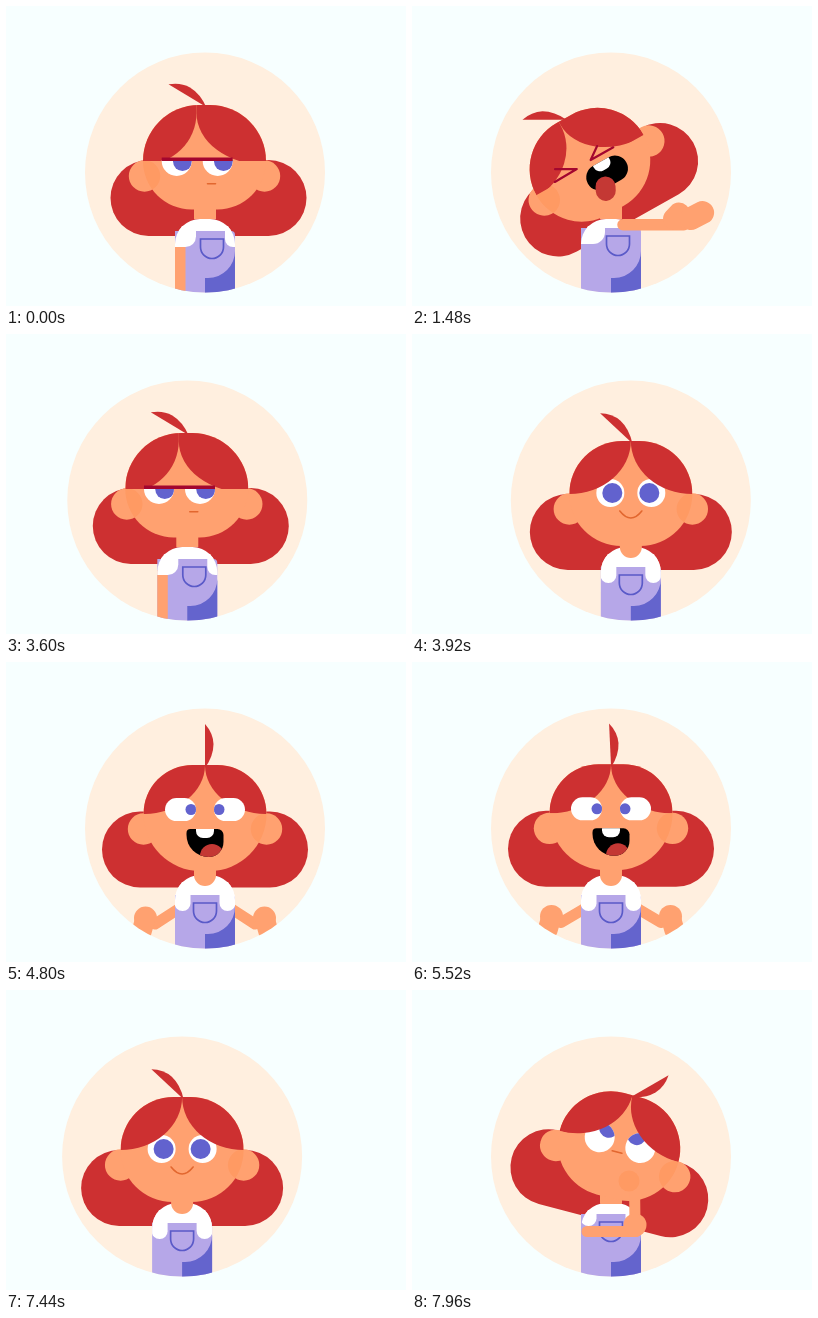
Write an HTML page with a canvas that moves like this. It is 400x300 px and loops after 8 s.

```html
<!DOCTYPE html>
<html lang="en">
<head>
<meta charset="utf-8">
<title>Moods</title>
<style>
html, body { margin: 0; height: 100%; overflow: hidden; background: #f7ffff; }
canvas { display: block; }
</style>
</head>
<body>
<canvas id="stage" width="400" height="300"></canvas>
<script>
const c = document.getElementById('stage').getContext('2d');
const HAIR = '#cd3031', SKIN = '#ffa170', EAR = '#ff9a63', LID = '#a3062f', IRIS = '#6262ce',
      LILAC = '#b6a7e8', BLUE = '#6464cd', LIP = '#e2672f';
const LOOP = 8000, GAP = 300;

// Head parts are relative to the middle of the fringe line; arm holds shoulder, wrist, two knuckles, two tips.
const smile = {
  x: 199, y: 160, r: 0, top: 53, jaw: 52, part: 0, drop: 0, earL: -61.5, earR: 61.5, earY: 15,
  lx: -63, ly: 38, rx: 63, ry: 38, tuft: -47, turn: 0,
  gap: 20.5, ey: -1, ew: 14, eh: 14, iris: 10, ix: 2, iy: 0, look: 0,
  mx: 0, my: 17, mw: 11, bend: 7, open: 0, neck: 224,
  sleeve: 249, wl: 15.5, wr: 15.5, cuff: 8, px: 199, py: 241,
  hang: 0, spread: 0, arm: [206, 300, 225, 330, 228, 335, 235, 340, 250, 300, 268, 302]
};
const happy = { ...smile, y: 152, top: 49, jaw: 57, lx: -65, ly: 35.5, rx: 65, ry: 35.5, tuft: 0,
  gap: 24.5, ey: -4.5, ew: 15.5, eh: 11.5, iris: 5.5, ix: 10.5, my: 29, open: 1, spread: 1 };
const grump = { ...smile, x: 198.5, y: 155, top: 56, jaw: 48.5, part: -8, drop: 8, earL: -60, earR: 60,
  lx: -56, ly: 37, rx: 64, ry: 37, tuft: -59, turn: -7.3,
  ey: 0, ew: 15, eh: 15, iris: 9.5, ix: 0, iy: .5, look: 5.8,
  mx: 7, my: 22.7, mw: 4, bend: 0, neck: 213,
  sleeve: 241, wl: 21, wr: 10, cuff: 0, px: 206, py: 233, hang: 1 };
const yuck = { ...grump, x: 178, y: 159, r: -29.4, top: 53, jaw: 52, part: -6, drop: 3,
  earL: -57, earR: 63, earY: 8, lx: -54, ly: 31, rx: 63, ry: 31, tuft: -90, mx: 11, my: 15.3, open: 1,
  sleeve: 238, wl: 24, wr: 0, py: 230, hang: 0,
  arm: [211, 218.7, 272, 218.7, 262, 213, 279, 212.5, 267, 207.6, 290.6, 206.6] };
const sulk = { ...yuck, x: 188.5, y: 163, r: -16.7, part: -11, drop: 8, earL: -61, earR: 61, earY: 11.6,
  lx: -56, ly: 32, rx: 62, ry: 32, tuft: -82, ey: -3, mx: 6, my: 14.6, open: 0,
  sleeve: 241, wr: 10, px: 205, py: 234,
  arm: [206, 234, 242, 270, 244, 282, 256, 280, 268, 222, 286.5, 222] };
const think = { ...smile, x: 207, y: 156.5, r: 14.7, tuft: 60, gap: 21, ey: -4, ew: 15, eh: 15,
  iris: 9.5, ix: 6.5, iy: -11, mx: -.5, my: 5.8, mw: 5, bend: 0,
  neck: 214, sleeve: 236, py: 232 };

const clamp = v => Math.min(1, Math.max(0, v));
const inOut = p => p < .5 ? 4 * p ** 3 : 1 - 4 * (1 - p) ** 3;
const easeIn = p => p * p, easeOut = p => p * (2 - p);
const back = p => 1 + 2.2 * (p - 1) ** 3 + 1.2 * (p - 1) ** 2;
const mix = (a, b, p) => Array.isArray(a) ? a.map((v, i) => mix(v, b[i], p)) : a + (b - a) * p;
const blend = (a, b, p) => Object.fromEntries(Object.keys(a).map(k => [k, mix(a[k], b[k], p)]));

// Each key: arrival time, pose, easing towards it.
const sour = [[740, grump], [1450, yuck, inOut], [2480, yuck, easeIn], [2960, sulk, easeIn], [3320, grump, easeOut]];
const sweet = [[4130, smile], [4740, happy, back], [5830, happy, easeIn], [6230, smile, inOut]];
function poseAt(keys, t) {
  let i = keys.findIndex(k => k[0] > t);
  if (i < 0) i = keys.length;
  if (i === 0 || i === keys.length) return { ...keys[i && i - 1][1] };
  const [t0, a] = keys[i - 1], [t1, b, ease] = keys[i];
  return blend(a, b, ease((t - t0) / (t1 - t0)));
}
const pulse = (t, a, b) => clamp((t - a) / 120) * clamp((b - t) / 120);

function fill(color, path) { c.fillStyle = color; c.fill(path); }
function box(x, y, w, h, r = 0) { const p = new Path2D(); p.roundRect(x, y, w, Math.max(h, 0), r); return p; }
function oval(x, y, rx, ry = rx) { const p = new Path2D(); p.ellipse(x, y, rx, ry, 0, 0, 7); return p; }
function line(color, width, ...pts) {
  c.strokeStyle = color; c.lineWidth = width; c.lineCap = c.lineJoin = 'round';
  c.beginPath();
  for (let i = 0; i < pts.length; i += 2) c.lineTo(pts[i], pts[i + 1]);
  c.stroke();
}
function inside(path, draw) { c.save(); c.clip(path); draw(); c.restore(); }
function inHead(p, draw) { c.save(); c.translate(p.x, p.y); c.rotate(p.r * Math.PI / 180); draw(); c.restore(); }

function body(p, flap) {
  if (p.spread > .05) for (const s of [-1, 1]) {
    const hx = 199 + s * mix(15, 59.5, p.spread), hy = mix(270, 256, p.spread) + flap;
    line(SKIN, 11, 199 + s * 22, 244, 199 + s * mix(18, 50, p.spread), 262 + flap, hx, hy + 3);
    fill(SKIN, oval(hx, hy, 11.5));
    line(SKIN, 20, hx, hy, hx + s * 4, hy + 14);
  }
  const shirt = box(169, 213, 60, 45, [25, 25, 0, 0]);
  fill('#fff', shirt);
  fill(SKIN, box(188, 190, 22, p.neck - 190, [0, 0, p.neck - 213, p.neck - 213]));
  fill(LILAC, box(169, p.py - 8, 60, 70, [0, 4, 0, 0]));
  fill(BLUE, new Path2D('M199 290V272H202A27 27 0 0 0 229 245V290Z'));
  if (p.hang > .05) fill(SKIN, box(169, mix(290, 236, p.hang), 10.5, 60));
  inside(shirt, () => {
    const h = p.sleeve - 220;
    fill('#fff', box(168.5, 220, p.wl + .5, h, [0, 0, p.wl / 2, p.cuff]));
    fill('#fff', box(229 - p.wr, 220, p.wr + .5, h, [0, 0, p.cuff, 8]));
  });
  c.strokeStyle = '#5a5ac8'; c.lineWidth = 1.7; c.lineJoin = 'miter';
  c.stroke(new Path2D(`M${p.px - 11.5} ${p.py}h23v8a11.5 11.5 0 0 1 -23 0z`));
}

function eyes(p, mode) {
  const xs = [-1, 1].map(s => p.turn + s * p.gap);
  if (mode === 'shut') {
    for (const x of xs) line(LID, 4.3, x - 12.5, p.ey + 1, x + 12.5, p.ey + 1);
  } else if (mode === 'squeeze') {
    line(LID, 2.2, -32.5, -13.5, -13.5, -3, -39, -2.5);
    line(LID, 2.2, 15.5, -13, 3, -4, 29, -4);
  } else {
    const draw = () => xs.forEach((x, i) => {
      const white = box(x - p.ew, p.ey - p.eh, p.ew * 2, p.eh * 2, Math.min(p.ew, p.eh));
      fill('#fff', white);
      inside(white, () => fill(IRIS, oval(x + (i ? -p.ix : p.ix) + p.look, p.ey + p.iy, p.iris)));
    });
    if (mode === 'lidded') {
      inside(box(-70, -1, 140, 60), draw);
      fill(LID, box(xs[0] - p.ew, -3.5, xs[1] - xs[0] + p.ew * 2, 3.5));
    } else draw();
  }
}

function mouth(p, wag) {
  const o = p.open;
  if (o < .1) {
    c.strokeStyle = LIP; c.lineWidth = 1.6; c.lineCap = 'round';
    c.stroke(new Path2D(`M${p.mx - p.mw} ${p.my}q${p.mw} ${p.bend * 2} ${p.mw * 2} 0`));
    return;
  }
  const out = p.turn < -3;
  c.save();
  c.translate(p.mx, p.my);
  c.scale(o, o);
  const shape = out ? box(-22, -13 - wag / 2, 44, 26 + wag, 13) : box(-18.5, -14, 37, 28 + wag, [4, 6, 15, 22]);
  fill('#000', shape);
  inside(shape, () => {
    fill('#fff', box(-9, -20, 18, out ? 16 : 15, 7));
    if (!out) fill('#c43834', oval(7, 13, 12));
  });
  if (out) line('#c43834', 20, -8, 11, -10 + wag / 2, 15 + wag);
  c.restore();
}

function head(p, mode, wag) {
  const w = 61.5, skull = box(-w, -p.top, w * 2, p.top + p.jaw, [p.top, p.top, p.jaw, p.jaw]);
  const ears = [p.earL, p.earR].map(x => oval(x, p.earY, 15.7));
  for (const ear of ears) fill(SKIN, ear);
  fill(SKIN, skull);
  inside(skull, () => fill(EAR, ears[p.turn < -3 ? 0 : 1]));
  const under = mode === 'open' && p.ew < 15.2;
  if (under) eyes(p, mode);
  inside(skull, () => inside(box(-70, -70, 140, 70), () => {
    for (const s of [-1, 1]) {
      const fringe = new Path2D();
      fringe.moveTo(s * w, -p.top - 2);
      fringe.lineTo(p.part, -p.top - 2);
      fringe.ellipse(s * w, p.drop - p.top, Math.abs(s * w - p.part), p.top - p.drop / 2,
        0, s < 0 ? 0 : Math.PI, Math.PI / 2, s > 0);
      fill(HAIR, fringe);
    }
  }));
  if (!under) eyes(p, mode);
  mouth(p, wag);
  c.save();
  c.translate(0, 1 - p.top);
  c.rotate((p.tuft - p.r) * Math.PI / 180);
  fill(HAIR, new Path2D('M0 2V-42Q8 -33 8.5 -22Q8.500 -10 0 2Z'));
  c.restore();
}

function reach([sx, sy, wx, wy, ax, ay, bx, by, cx, cy, dx, dy], sway) {
  line(SKIN, 11.5, sx, sy, wx, wy + sway);
  line(SKIN, 22, ax, ay + sway, cx, cy + sway);
  line(SKIN, 23, bx, by + sway, dx, dy + sway);
}

function girl(dx, p, mode, { wag = 0, sway = 0, flap = 0 } = {}) {
  c.save();
  c.translate(dx, 0);
  const disc = oval(199, 166.5, 120);
  fill('#ffefdf', disc);
  inside(disc, () => {
    inHead(p, () => line(HAIR, 76, p.lx, p.ly, p.rx, p.ry));
    body(p, flap);
    inHead(p, () => head(p, mode, wag));
    reach(p.arm, sway);
    if (p.r > 5) {
      line(SKIN, 11, 175, 241.5, 224, 241.5);
      line(SKIN, 11, 223, 234, 222.5, 194);
      fill(SKIN, oval(223, 235, 11.5));
      fill(EAR, oval(217, 191, 10.5));
    }
  });
  c.restore();
}

function sourGirl(dx, t) {
  const live = pulse(t, 1450, 2560);
  const mode = t < 860 ? 'lidded' : t < 1080 ? 'shut' : t < 2660 ? 'squeeze' : t < 3090 ? 'shut' : 'lidded';
  girl(dx, poseAt(sour, t), mode, {
    wag: live * 2 * Math.sin((t - 1480) / 52),
    sway: live * 4 * Math.sin((t - 1480) / 64)
  });
}

function sweetGirl(dx, t) {
  const p = poseAt(sweet, t), live = pulse(t, 4740, 5830), beat = live * Math.sin((t - 4800) / 60);
  p.y += beat * 1.2;
  p.tuft += beat * 5;
  const shut = t > 4230 && t < 4390 || t > 5930 && t < 6350;
  girl(dx, p, shut ? 'shut' : 'open', { wag: beat, flap: beat * 3 });
}

function render(t) {
  c.fillStyle = '#f7ffff';
  c.fillRect(0, 0, 400, 300);
  const a = GAP * inOut(clamp((t - 3444) / 640)), b = GAP * inOut(clamp((t - 7270) / 640));
  inside(box(50, 0, 300, 300), () => {
    if (a < GAP) sourGirl(-a, t);
    if (a > 0 && b < GAP) sweetGirl(GAP - a - b, t);
    if (b > 0) girl(GAP - b, think, 'open');
  });
}

function tick() {
  render(performance.now() % LOOP);
  requestAnimationFrame(tick);
}
tick();
</script>
</body>
</html>
```
